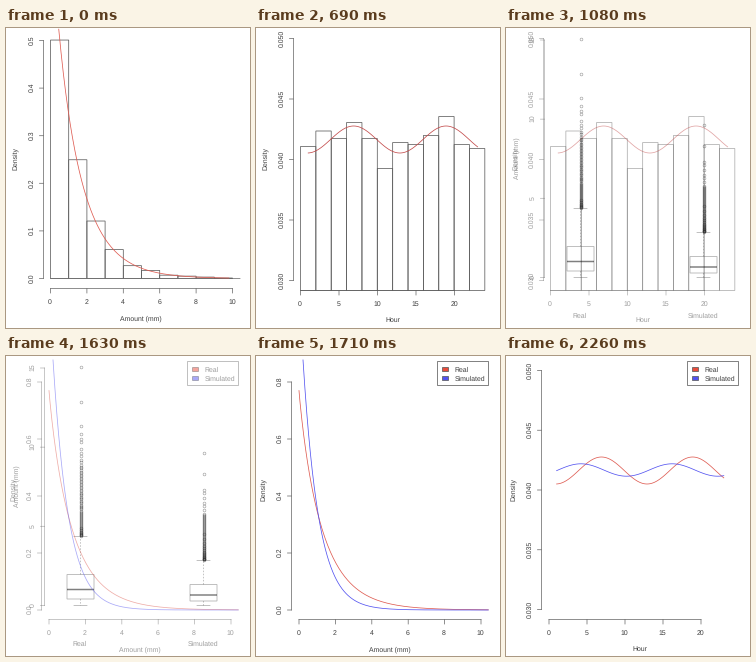
These frames come from a looping animation (244x300 px, 2.72 s). A matplotlib script:

```python
import numpy as np
import matplotlib.pyplot as plt
from matplotlib.animation import FuncAnimation
from matplotlib.patches import Rectangle

W, H, DPI = 244, 300, 100
PX = 72 / DPI
LOOP, STEP = 2720, 10
STARTS = [0, 530, 1080, 1630, 2180]
FADES = [0, 0, 80, 80, 80]
INK, AXIS, TEXT = "#5a5a5a", "#6c6c6c", "#3c3c3c"
RED, BRIGHT_RED, DARK_RED, BLUE = "#de5a50", "#ea4c3c", "#c24848", "#5252f0"

plt.rcParams.update({"font.family": "Liberation Sans", "text.hinting": "none"})
fig = plt.figure(figsize=(W / DPI, H / DPI), dpi=DPI, facecolor="white")
ax = fig.add_axes([0, 0, 1, 1])
ax.set(xlim=(0, W), ylim=(H, 0))
ax.axis("off")


class Scene:
    """A chart whose artists can be shown and faded together."""

    def __init__(self):
        self.parts = []

    def line(self, x, y, color=AXIS, lw=0.75, **kw):
        art, = ax.plot(x, y, color=color, lw=lw * PX, snap=False, **kw)
        self.parts.append(art)
        return art

    def text(self, x, y, label, rotation=0, ha="center"):
        dx, dy = (0.6, 0) if rotation else (0, 0.6)
        self.parts.append(ax.text(x + dx, y + dy, label, color=TEXT, size=6.9 * PX,
                                  rotation=rotation, ha=ha, va="center"))

    def box(self, x0, y0, x1, y1, fill="none", color=INK, lw=0.75):
        self.parts.append(ax.add_patch(Rectangle(
            (x0, y0), x1 - x0, y1 - y0, fc=fill, ec=color, lw=lw * PX,
            snap=False, zorder=2)))

    def y_axis(self, x, bottom, top, labels, title, title_y):
        self.line([x, x], [bottom, top])
        for y, label in zip(np.linspace(bottom, top, len(labels)), labels):
            self.line([x - 4, x], [y, y])
            self.text(x - 12.5, y - 0.5, label, 90)
        self.text(x - 28.5, title_y, title, 90)

    def x_axis(self, y, left, right, labels, title, title_x, title_y):
        self.line([left, right], [y, y])
        for x, label in zip(np.linspace(left, right, len(labels)), labels):
            self.line([x, x], [y, y + 4.5])
            self.text(x - 0.5, y + 13.5, label)
        self.text(title_x, title_y, title)

    def legend(self):
        self.box(181.5, 5.5, 232.5, 29.5, "white")
        for y, fill, label in [(13.5, BRIGHT_RED, "Real"), (22.5, BLUE, "Simulated")]:
            self.box(186.5, y - 2, 192.5, y + 2, fill)
            self.text(198.5, y, label, ha="left")

    def show(self, alpha):
        for art in self.parts:
            art.set_visible(alpha > 0)
            art.set_alpha(alpha)


def real_density(x):
    return 0.77 * np.exp(-0.8 * x ** 0.93)


def simulated_density(x):
    return 1.13 * np.exp(-1.15 * x)


def wave(x, peak):
    return np.cos(2 * np.pi * (x - peak) / 12)


def decimals(start, stop, count, digits):
    return [f"{v:.{digits}f}" for v in np.linspace(start, stop, count)]


AMOUNTS = [str(v) for v in range(0, 11, 2)]
HOURS = [str(v) for v in range(0, 21, 5)]
hour = np.linspace(1, 23, 120)


def amount_histogram():
    s = Scene()
    s.y_axis(37.5, 250.5, 12.5, decimals(0, 0.5, 6, 1), "Density", 131)
    s.x_axis(260.5, 44.5, 226.5, AMOUNTS, "Amount (mm)", 135, 290)
    heights = [0.502, 0.25, 0.121, 0.061, 0.027, 0.017, 0.007, 0.005, 0.003, 0.001]
    for i, h in enumerate(heights):
        x = 44.5 + 18.2 * i
        s.box(x, 250.5 - 475 * h, x + 18.2, 250.5)
    s.line([44.5, 234], [250.5, 250.5])
    x = np.linspace(0.453, 9.8, 150)
    s.line(44.5 + 18.2 * x, 250.5 - 475 * real_density(x), RED)
    return s


def hour_histogram():
    s = Scene()
    s.y_axis(37.5, 252.5, 10.5, decimals(0.03, 0.05, 5, 3), "Density", 131)
    s.x_axis(262.5, 44.5, 198.5, HOURS, "Hour", 137, 292)
    tops = [118.5, 103, 110.5, 94.5, 110.5, 140.5, 114.5, 116.5, 107.5, 88.5,
            116.5, 120.5]
    for i, top in enumerate(tops):
        x = 44.5 + 15.36 * i
        s.box(x, top, x + 15.36, 262.5)
    curve = s.line(44.5 + 7.7 * hour, 111.5 - 13.5 * wave(hour, 6.9), DARK_RED)
    return s, curve


def box_plot():
    s = Scene()
    s.y_axis(38.5, 249.5, 12, ["0", "5", "10", "15"], "Amount (mm)", 130)

    def column(x, cap, q3, median, q1, dense_end, sparse, label):
        for y0, y1 in [(q3, cap), (q1, 249.5)]:
            s.line([x, x], [y0, y1], INK, 0.7, dashes=(2.2, 2.2))
            s.line([x - 6.5, x + 6.5], [y1, y1], INK)
        s.box(x - 13.5, q3, x + 13.5, q1)
        s.line([x - 13.5, x + 13.5], [median, median], "black", 1.5,
               solid_capstyle="butt")
        u = np.linspace(0, 1, 65)
        dots = np.r_[cap - 1 - (cap - 1 - dense_end) * u ** 1.5, sparse]
        s.line(np.full(len(dots), x), dots, "none", marker="o", ms=2.8 * PX,
               mfc="none", mec="#2c2c2c", mew=0.55 * PX)
        s.text(x - 0.5, 288, label)

    column(74.5, 180.5, 218.5, 233.5, 243, 109,
           [11, 46, 70, 78, 83, 86, 93, 97, 100, 104, 106], "Real")
    column(197.5, 204.5, 228.5, 239, 245, 158,
           [97, 118, 134, 137, 142, 147, 150, 154], "Simulated")
    return s


def amount_curves():
    s = Scene()
    s.y_axis(35.5, 254, 26, decimals(0, 0.8, 5, 1), "Density", 134)
    s.x_axis(263.5, 43, 225, AMOUNTS, "Amount (mm)", 134, 293)
    for f, start, color in [(real_density, 0, RED), (simulated_density, 0.22, BLUE)]:
        x = np.linspace(start, 10.4, 200)
        s.line(43 + 18.2 * x, 254 - 285 * f(x), color)
    s.legend()
    return s


def hour_curves():
    s = Scene()
    s.y_axis(35.5, 253.5, 14.5, decimals(0.03, 0.05, 5, 3), "Density", 134)
    s.x_axis(263.5, 43, 195, HOURS, "Hour", 134, 293)
    x = 43 + 7.6 * hour
    s.line(x, 114.5 - 13.5 * wave(hour, 6.9), RED)
    s.line(x, 114 - 6.2 * wave(hour, 4.2), BLUE)
    s.legend()
    return s


hours, hours_curve = hour_histogram()
scenes = [amount_histogram(), hours, box_plot(), amount_curves(), hour_curves()]


def update(n):
    t = n * STEP
    k = sum(t >= start for start in STARTS) - 1
    fading = t < STARTS[k] + FADES[k]
    for i, scene in enumerate(scenes):
        if fading:
            scene.show(0.5 if i in (k - 1, k) else 0)
        else:
            scene.show(float(i == k))
    hours_curve.set_color(BRIGHT_RED if t < 690 else DARK_RED)
    return []


anim = FuncAnimation(fig, update, frames=LOOP // STEP, interval=STEP,
                     repeat=True, repeat_delay=0)
plt.show()
```
